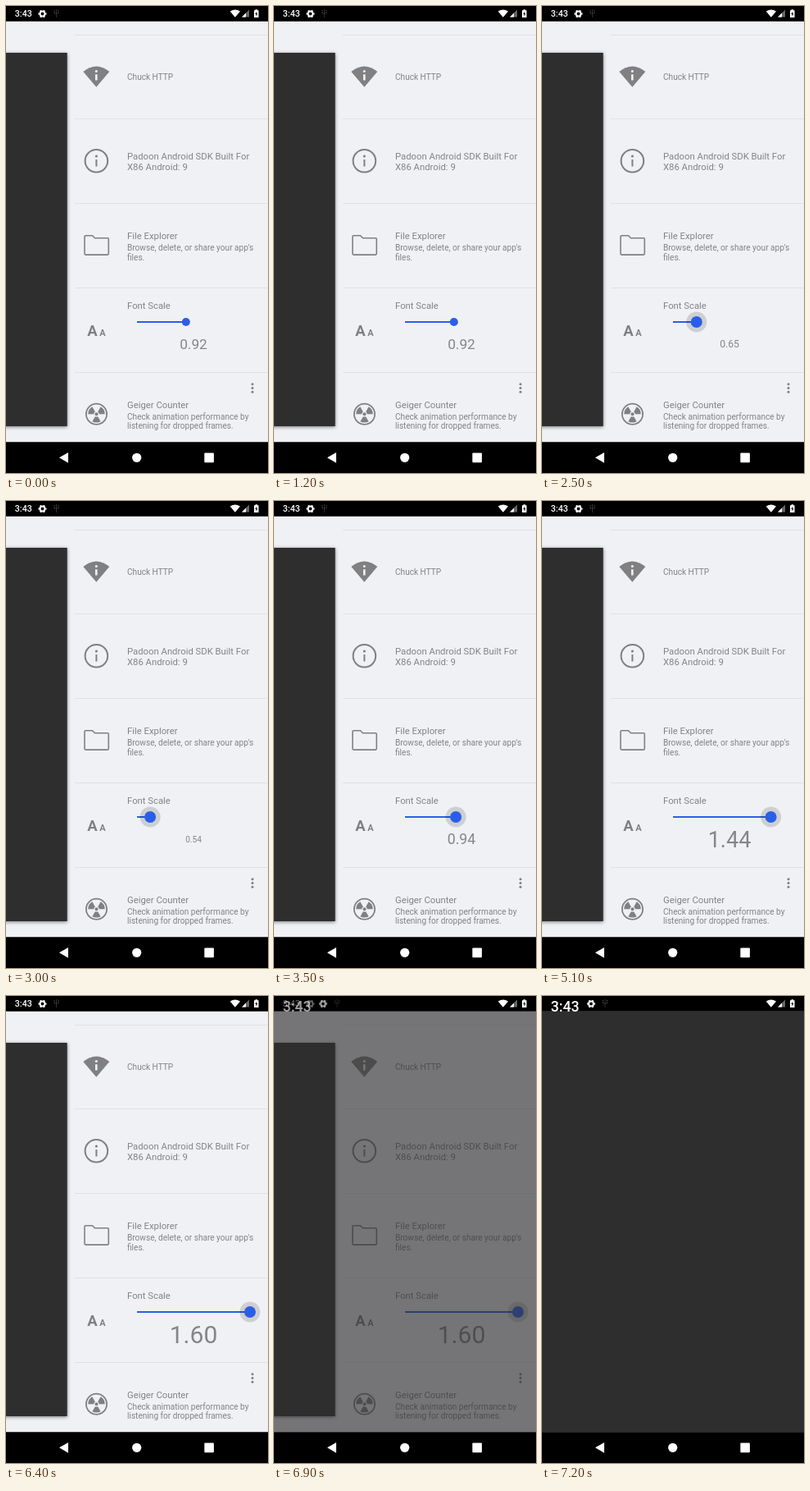
An HTML page for the animation above (8 s loop, 320 px wide and 569 px high).

```html
<!DOCTYPE html>
<html lang="en">
<head>
<meta charset="utf-8">
<title>Font scale slider</title>
<style>
  html, body { margin: 0; width: 100%; height: 100%; overflow: hidden; background: #000; }
  svg { display: block; width: 100vw; height: 100vh; font-family: Roboto, sans-serif; }
  .title { font-size: 11.3px; fill: #838385; }
  .sub { font-size: 10.1px; fill: #838385; }
  .clock { font-weight: 500; fill: #fff; }
  .line { fill: none; stroke: #808082; stroke-width: 2; }
  .card { filter: drop-shadow(0 1px 2px rgba(0, 0, 0, .5)); }
</style>
</head>
<body>
<svg viewBox="0 0 320 569">
  <defs>
    <g id="gear" fill="none" stroke="#fff">
      <circle r="2.9" stroke-width="2"/>
      <circle r="4.2" stroke-width="1.6" pathLength="12" stroke-dasharray="1 1" stroke-dashoffset=".5"/>
    </g>
    <path id="antenna" d="M-2.5-4v4M0-4.5v10M2.5-4v4M-2.5 0h5" fill="none" stroke="#777" stroke-width=".8" stroke-dasharray="1 1"/>
  </defs>

  <rect y="18.5" width="320" height="513" fill="#f0f1f4"/>
  <rect class="card" x="-10" y="57" width="84.7" height="455" fill="#2e2e2e"/>
  <path d="M84 35.5H320M84 137.5H320M84 240.5H320M84 343.5H320M84 446.5H320" stroke="#e0e1e4"/>

  <g fill="#808082">
    <path d="M94.3 80Q110.300 67 126.300 80L110.300 98.800Z"/>
    <path d="M110.300 83.300V90.500" stroke="#f0f1f4" stroke-width="2.600"/>
    <circle cx="110.300" cy="79.600" r="1.500" fill="#f0f1f4"/>

    <circle class="line" cx="110.400" cy="188.800" r="13.800"/>
    <path class="line" d="M110.400 187V195.500" stroke-width="2.600"/>
    <circle cx="110.400" cy="183" r="1.600"/>

    <path class="line" d="M96 302V281Q96 279.700 97.300 279.700H105.500L108.500 282.800H124Q125.300 282.800 125.300 284.100V301.800Q125.300 303.100 124 303.100H97.300Q96 303.100 96 301.800Z" style="stroke-width:1.600"/>

    <text x="99.300" y="401.500" font-size="18.500" font-weight="700">A</text>
    <text x="114.300" y="401.500" font-size="11" font-weight="700">A</text>

    <g transform="translate(110.500 497.300)">
      <circle class="line" r="12.600" style="stroke-width:1.800"/>
      <circle r="2"/>
      <circle r="6.800" fill="none" stroke="#808082" stroke-width="7" pathLength="6" stroke-dasharray="1 1" stroke-dashoffset="1"/>
    </g>
    <circle cx="301" cy="460.700" r="1.500"/>
    <circle cx="301" cy="465.500" r="1.500"/>
    <circle cx="301" cy="470.300" r="1.500"/>
  </g>

  <text class="sub" x="148" y="90.300">Chuck HTTP</text>
  <g class="title">
    <text x="148" y="187">Padoon Android SDK Built For</text>
    <text x="148" y="200">X86 Android: 9</text>
    <text x="148" y="283.700">File Explorer</text>
    <text x="148" y="369">Font Scale</text>
    <text x="148" y="489.500">Geiger Counter</text>
  </g>
  <g class="sub">
    <text x="148" y="298">Browse, delete, or share your app's</text>
    <text x="148" y="309.700">files.</text>
    <text x="148" y="503.500">Check animation performance by</text>
    <text x="148" y="515.300">listening for dropped frames.</text>
  </g>

  <path id="track" stroke="#2b5ee8" stroke-width="2"/>
  <g id="thumb">
    <circle id="ripple" r="12.500" fill="#000" fill-opacity=".14"/>
    <circle id="knob" fill="#2b5ee8"/>
  </g>
  <text id="value" x="229" text-anchor="middle" fill="#858587"></text>

  <rect id="dark" y="18.500" width="320" height="513" fill="#2e2e2e"/>

  <path d="M0 0H320V18.500H0ZM0 531.500H320V569H0Z"/>
  <g id="oldStatus">
    <text class="clock" x="10.800" y="13" font-size="10.700">3:43</text>
    <use href="#gear" x="44.500" y="9.500"/>
    <use href="#antenna" x="61.500" y="9"/>
  </g>
  <g id="newStatus">
    <text class="clock" x="10.800" y="19" font-size="17.700">3:43</text>
    <use href="#gear" x="60" y="9.500"/>
    <use href="#antenna" x="77" y="9"/>
  </g>
  <g fill="#fff">
    <path d="M273.700 6.500Q279.800 2.300 286 6.500L279.800 13.700Z"/>
    <path d="M297 4.500V13.500H288Z" fill="#666"/>
    <path d="M293 8.500V13.500H288Z"/>
    <path d="M303 5.300H304.500V4.300H307V5.300H308.500V14H303Z"/>
    <path d="M306.200 6.500L304.300 10H305.500V12.700L307.300 9.200H306.200Z" fill="#000"/>
    <path d="M65 550.300L76 544V556.700Z"/>
    <circle cx="159.700" cy="550.300" r="5.600"/>
    <rect x="242.300" y="544.600" width="11.600" height="11.600" rx="1"/>
  </g>
</svg>
<script>
const DURATION = 8000, STEP = 100;
// [time in ms, value]
const scale = [[1900, .92], [2100, .85], [2500, .65], [2700, .59], [2900, .53], [3100, .55],
  [3300, .70], [3500, .94], [3600, 1.13], [3700, 1.21], [4300, 1.21], [5100, 1.44],
  [5200, 1.44], [5500, 1.59], [6300, 1.59], [6400, 1.6]];
const fade = [[6800, 0], [6900, .63], [7000, .84], [7100, .95], [7200, 1]];

const el = id => document.getElementById(id);
const set = (id, attrs) => {
  for (const name in attrs) el(id).setAttribute(name, attrs[name]);
};

function sample(keys, t) {
  const i = keys.findIndex(key => key[0] > t);
  if (i === 0) return keys[0][1];
  if (i < 0) return keys[keys.length - 1][1];
  const [t0, a] = keys[i - 1], [t1, b] = keys[i];
  return a + (b - a) * (t - t0) / (t1 - t0);
}

function draw(now) {
  const t = Math.floor(now % DURATION / STEP) * STEP;
  const value = sample(scale, t), x = 160 + 115 * (value - .4);
  const size = 18.75 * value, pressed = t >= 1900, alpha = sample(fade, t);

  set('track', { d: `M160 385H${x}` });
  set('thumb', { transform: `translate(${x} 385)` });
  set('ripple', { opacity: pressed ? 1 : 0 });
  set('knob', { r: pressed ? 7 : 5 });
  set('value', { y: 412 + size * .355, 'font-size': size });
  el('value').textContent = value.toFixed(2);
  set('dark', { opacity: alpha });
  set('oldStatus', { opacity: 1 - alpha });
  set('newStatus', { opacity: alpha });
  requestAnimationFrame(draw);
}
draw(0);
</script>
</body>
</html>
```
